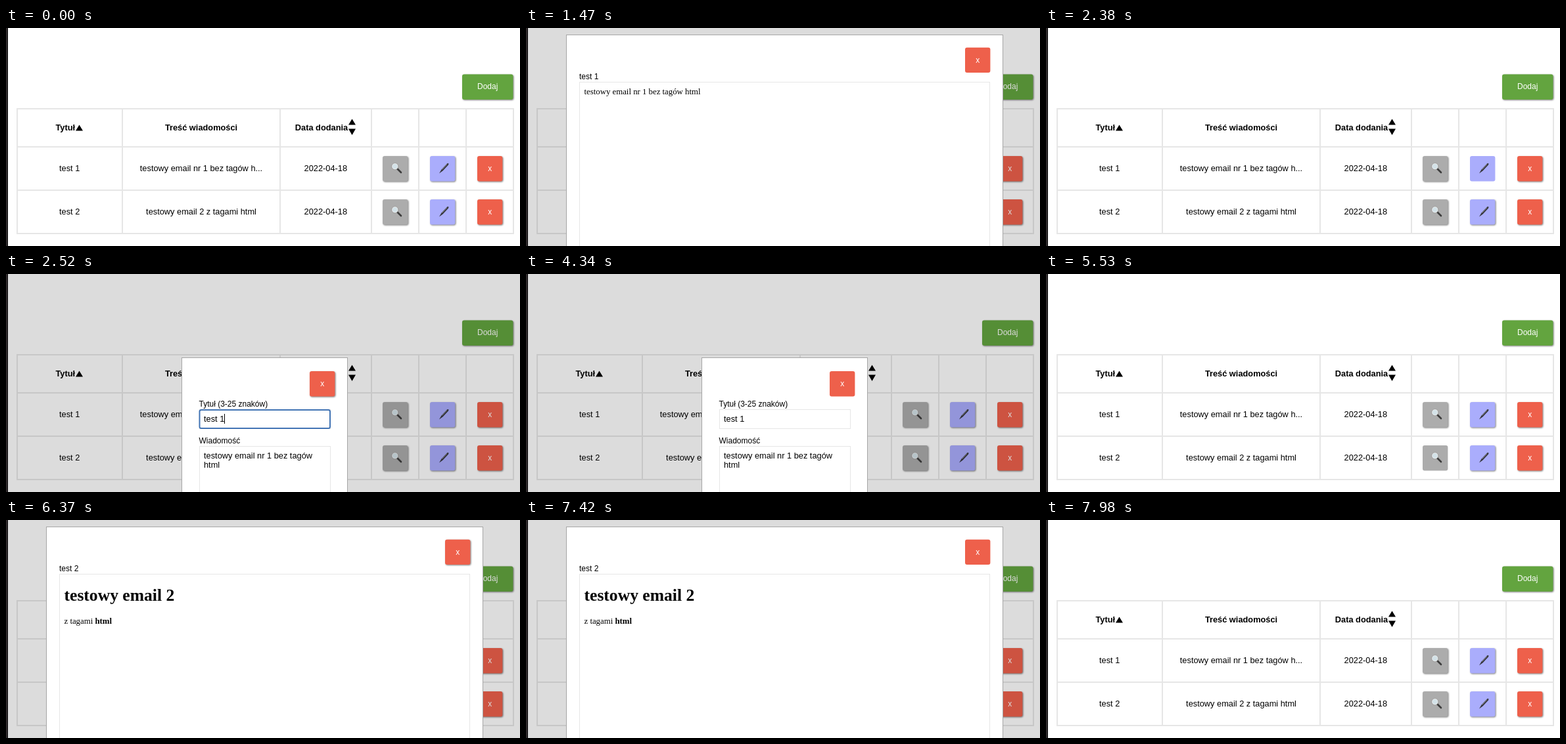
An HTML page that plays this animation: 782 px wide and 332 px high, repeating every 8 s.

```html
<!DOCTYPE html>
<html lang="pl">
<head>
<meta charset="utf-8">
<style>
html, body { margin: 0; width: 100%; height: 100%; overflow: hidden; background: #fff; }
svg { display: block; }
text { font: 12.8px "Liberation Sans", Arial, sans-serif; white-space: pre; }
.mid { text-anchor: middle; }
.bold { font-weight: bold; }
.small { font-size: 12px; }
.btn { filter: drop-shadow(1.3px 1.3px 1px rgba(0, 0, 0, .5)); }
.btn.down { filter: none; }
.btn text { fill: #fff; font-size: 12px; text-anchor: middle; }
.box { fill: #fff; stroke: #e6e6e6; }
.modal { fill: #fff; stroke: #a6a6a6; }
.mail text { font-family: "Liberation Serif", Times, serif; }
.mail .h1 { font-size: 25.6px; font-weight: bold; }
</style>
</head>
<body>
<svg id="stage" width="782" height="332" viewBox="0 0 782 332"></svg>
<script>
const LOOP = 8000;
const GREY = '#acacac', LILAC = '#aaadfc', RED = '#ee604b', GREEN = '#63a43f';

const text = (x, y, s, cls = '') => `<text x="${x}" y="${y}" class="${cls}">${s}</text>`;
const rect = (x, y, w, h, attrs) => `<rect x="${x}" y="${y}" width="${w}" height="${h}" ${attrs}/>`;
const group = (id, body) => `<g id="${id}">${body}</g>`;
const button = (id, x, y, fill, body, w = 38.4) =>
  `<g class="btn" id="${id}" transform="translate(${x} ${y})">${rect(0, 0, w, 38.4, `rx="3" fill="${fill}"`)}${body}</g>`;
const cross = text(19.2, 23, 'x');

const lens = `<path d="M22 19 28 25" stroke="#3c3c3c" stroke-width="2.6" stroke-linecap="round"/>
  <circle cx="18.8" cy="15.8" r="4.4" fill="#d3e2e8" stroke="#f0f0f0" stroke-width="1.2"/>
  <circle cx="18.8" cy="15.8" r="5" fill="none" stroke="#777" stroke-width=".5"/>`;
const pen = `<path d="M14 26.5 17.5 20.5 26.5 11 28.5 11.2 28 13.5 19.5 22.5Z" fill="#35363c"/>
  <path d="M18.5 20.5 26 12.5" stroke="#a5a5ad" stroke-width=".8"/>`;

const row = (n, y, mail) =>
  text(96.7, y + 23.2, 'test ' + n, 'mid') +
  text(297, y + 23.2, mail, 'mid') +
  text(486.3, y + 23.2, '2022-04-18', 'mid') +
  button('view' + n, 573, y, GREY, lens) +
  button('edit' + n, 645, y, LILAC, pen) +
  button('drop' + n, 717, y, RED, cross);

const grid = [17, 177, 417, 556, 628, 700, 772].map(x => `M${x} 122V314`).join('') +
  [123, 181, 247, 313].map(y => `M16 ${y}H773`).join('');

const page =
  button('add', 694, 70.5, GREEN, text(38.7, 22.5, 'Dodaj'), 77.5) +
  `<path d="${grid}" fill="none" stroke="#e6e6e6" stroke-width="2"/>` +
  text(75.5, 156, 'Tytuł', 'bold') +
  text(297, 156, 'Treść wiadomości', 'mid bold') +
  text(439.8, 156, 'Data dodania', 'bold') +
  '<path d="M106 156.5 111.5 147.5 117 156.5ZM521 147.5 526.5 138.5 532 147.5ZM521 153.5H532L526.5 163Z"/>' +
  row(1, 195, 'testowy email nr 1 bez tagów h...') +
  row(2, 261, 'testowy email 2 z tagami html');

const viewer = (n, mail) => group('viewer' + n,
  rect(61.5, 10.5, 664, 400, 'class="modal"') +
  button('closeView' + n, 668, 29.7, RED, cross) +
  text(81, 78, 'test ' + n, 'small') +
  rect(81.5, 82.5, 624, 300, 'class="box"') +
  `<g class="mail">${mail}</g>`);

const editor = group('editor',
  rect(267.5, 127.5, 252, 300, 'class="modal"') +
  button('closeEdit', 462, 148, RED, cross) +
  text(293.5, 202, 'Tytuł (3-25 znaków)', 'small') +
  rect(294.5, 206.5, 199, 29, 'class="box"') +
  group('focus', rect(294.5, 207, 198.5, 28, 'rx="2.5" fill="#fff" stroke="#4274b4" stroke-width="2"')) +
  text(301, 225, 'test 1') +
  group('caret', rect(332, 213, 1, 15, '')) +
  text(293.5, 258, 'Wiadomość', 'small') +
  rect(294.5, 262.5, 199, 120, 'class="box"') +
  text(301, 281, 'testowy email nr 1 bez tagów') +
  text(301, 295, 'html'));

stage.innerHTML = page +
  group('shade', rect(0, 0, 782, 332, 'fill="#000" opacity=".137"')) +
  viewer(1, text(88.5, 101, 'testowy email nr 1 bez tagów html')) +
  viewer(2, text(88.5, 123, 'testowy email 2', 'h1') +
    text(88.5, 158, 'z tagami <tspan class="bold">html</tspan>')) +
  editor +
  rect(0, 0, 2, 332, 'fill="#302b2d"') + rect(2, 0, 1, 332, 'fill="#080808"');

// [start, end) spans in ms
const shown = {
  viewer1: [[210, 1610]],
  editor: [[2520, 4410]],
  viewer2: [[5600, 7490]],
  focus: [[2520, 4130]],
  caret: [[2520, 2940], [3430, 3990]]
};
shown.shade = [...shown.viewer1, ...shown.editor, ...shown.viewer2];
const pressed = {
  view1: [[70, 210]],
  closeView1: [[1470, 1610]],
  edit1: [[2380, 2520]],
  closeEdit: [[4200, 4410]],
  view2: [[5460, 5600]],
  closeView2: [[7350, 7490]]
};
const el = id => document.getElementById(id);
const within = (spans, t) => spans.some(([a, b]) => t >= a && t < b);

function draw(now) {
  const t = now % LOOP;
  for (const id in shown) el(id).style.display = within(shown[id], t) ? '' : 'none';
  for (const id in pressed) el(id).classList.toggle('down', within(pressed[id], t));
  requestAnimationFrame(() => draw(performance.now() - start));
}
const start = performance.now();
draw(0);
</script>
</body>
</html>
```
